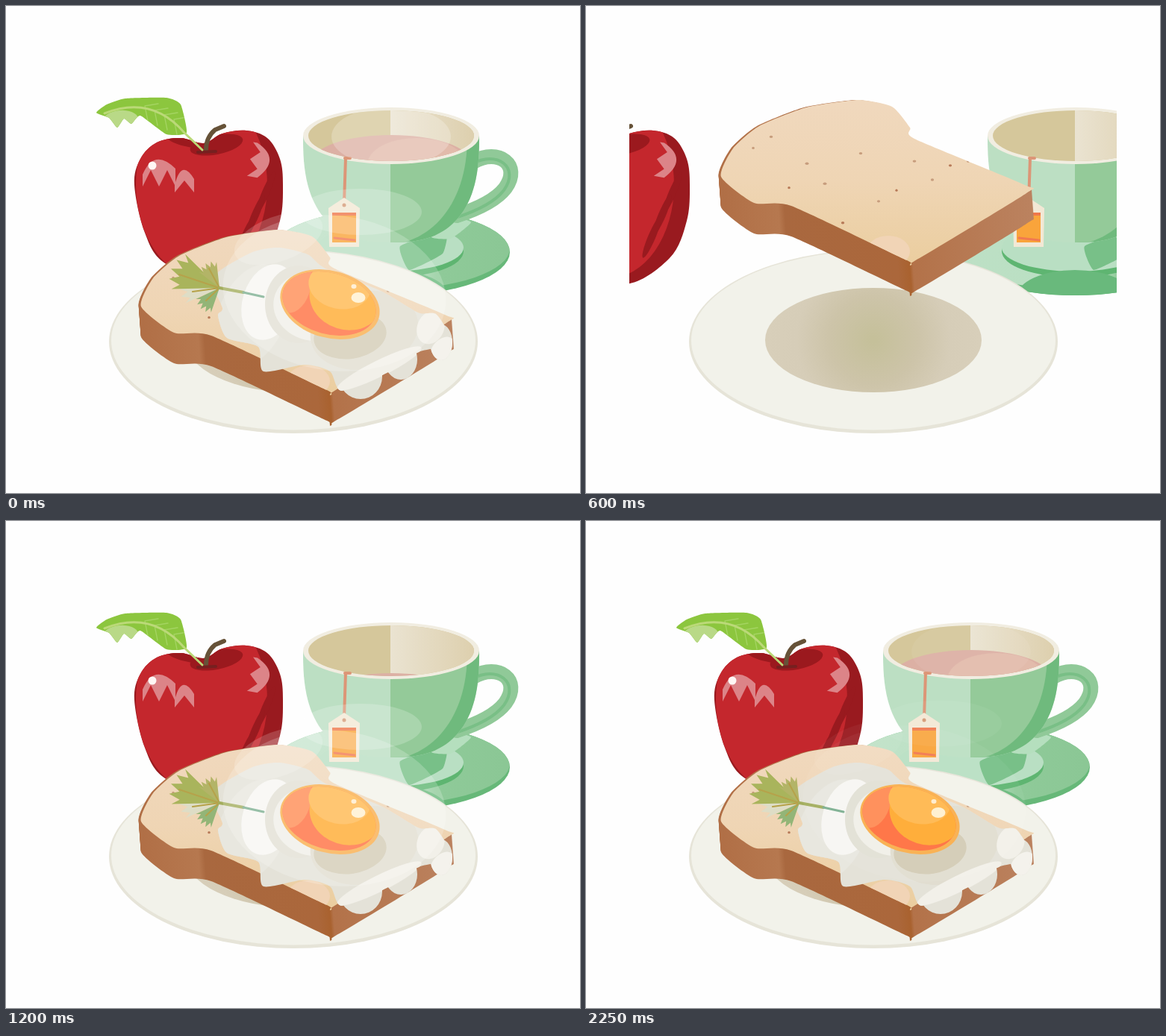
Recreate the animation shown at these times as an HTML page with a canvas. Size 769x653 px, loop 2.4 s.

```html
<!DOCTYPE html>
<html lang="en">
<head>
<meta charset="utf-8">
<title>Breakfast</title>
<style>
html, body { margin: 0; width: 100%; height: 100%; overflow: hidden; background: #fefefe; }
canvas { display: block; }
</style>
</head>
<body>
<canvas id="stage" width="769" height="653"></canvas>
<script>
const ctx = document.getElementById('stage').getContext('2d');
const STEP = 150, STEPS = 16;

// Smooth closed curve through a few key points.
function curve(points, k = 0.85) {
  const path = new Path2D(), n = points.length, t = k / 6;
  const p = i => points[(i + n) % n];
  path.moveTo(...p(0));
  for (let i = 0; i < n; i++) {
    const [a, b, c, d] = [p(i - 1), p(i), p(i + 1), p(i + 2)];
    path.bezierCurveTo(b[0] + (c[0] - a[0]) * t, b[1] + (c[1] - a[1]) * t,
      c[0] - (d[0] - b[0]) * t, c[1] - (d[1] - b[1]) * t, ...c);
  }
  return path;
}

function oval(x, y, rx, ry, turn = 0) {
  const path = new Path2D();
  path.ellipse(x, y, rx, ry, turn, 0, Math.PI * 2);
  return path;
}

// Lower half of a superellipse: the side view of a cup.
function basin(x, y, rx, ry, power) {
  const path = new Path2D();
  for (let a = 0; a <= 1.0001; a += 1 / 60) {
    const c = Math.cos(a * Math.PI), s = Math.abs(Math.sin(a * Math.PI));
    path.lineTo(x + rx * Math.sign(c) * Math.abs(c) ** (2 / power), y + ry * s ** (2 / power));
  }
  return path;
}

function box(x, y, w, h, color) {
  ctx.fillStyle = color;
  ctx.fillRect(x, y, w, h);
}

function fill(path, color) {
  ctx.fillStyle = color;
  ctx.fill(path);
}

function line(d, color, width) {
  ctx.strokeStyle = color;
  ctx.lineWidth = width;
  ctx.lineCap = 'round';
  ctx.stroke(new Path2D(d));
}

function inside(path, draw) {
  ctx.save();
  ctx.clip(path);
  draw();
  ctx.restore();
}

function at(dx, dy, draw, turn = 0) {
  ctx.save();
  ctx.translate(dx, dy);
  ctx.rotate(turn);
  draw();
  ctx.restore();
}

function random(seed) {
  return () => (seed = seed * 16807 % 2147483647) / 2147483647;
}

function blend(g, stops) {
  stops.forEach(([t, color]) => g.addColorStop(t, color));
  return g;
}

function drawPlate() {
  fill(oval(385, 450, 247, 123), '#e6e4d8');
  fill(oval(385, 448.5, 244, 120), '#f2f2ea');
  fill(oval(385, 448, 145, 70), blend(ctx.createRadialGradient(385, 448, 4, 385, 448, 145),
    [[0, '#c5c09a'], [0.4, '#cdc4a9'], [0.7, '#d6cdb8'], [1, '#d8cfba']]));
}

const slice = curve([[181, 403], [197, 365], [232, 335], [295, 310], [365, 300], [410, 309], [434, 337],
  [440, 352], [588, 414], [590, 425], [440, 516], [430, 515], [275, 442], [225, 438]], 0.6);

function drawBread() {
  const crust = blend(ctx.createLinearGradient(176, 0, 596, 0), [[0, '#b06e45'], [0.2, '#b6784f'], [0.22, '#a9683f'],
    [0.58, '#ab673b'], [0.62, '#a9622f'], [0.63, '#b37249'], [1, '#bb825f']]);
  for (let depth = 41; depth >= 0; depth--) {
    const edge = depth / 41;
    at(edge * 3 - 3, depth, () => fill(slice, crust));
  }
  fill(slice, blend(ctx.createLinearGradient(0, 305, 0, 515), [[0, '#f0d8bd'], [0.5, '#efd5b4'], [1, '#ebcea0']]));
  inside(slice, () => {
    fill(oval(405, 503, 29, 21), '#f1d4b6');
    const rnd = random(77);
    for (let i = 0; i < 16; i++) {
      const x = 200 + i * 24, y = 322 + x * 0.1 + rnd() * 110;
      fill(oval(x, y, 1.5 + rnd(), 1.7), i % 3 ? '#c79d7d' : '#b77a58');
    }
  });
}

const eggWhite = curve([[277, 364], [328, 331], [365, 324], [404, 333], [428, 352], [502, 382], [552, 411],
  [577, 414], [596, 452], [553, 464], [510, 492], [450, 516], [434, 490], [400, 481], [345, 490], [338, 457],
  [296, 445], [284, 415], [290, 405]], 0.75);
for (let i = 0; i < 3; i++) {
  eggWhite.addPath(oval(475 + 54 * i, 497 - 23 * i, 29 - 7 * i, 30 - 3 * i));
}

function drawParsley() {
  const sprig = (turn, size, color) => at(286, 378, () => {
    ctx.beginPath();
    ctx.moveTo(0, 0);
    for (let i = 0; i <= 8; i++) {
      const a = (i - 4) * 0.1, r = size * (i % 2 ? 0.8 : 1) * Math.cos(a);
      ctx.lineTo(r * Math.cos(a), r * Math.sin(a));
    }
    ctx.fillStyle = color;
    ctx.fill();
  }, turn);
  sprig(3.12, 54, '#deddc6');
  sprig(3.52, 70, '#a9b45c');
  sprig(4.2, 38, '#b3b467');
  sprig(2.3, 38, '#93b577');
  line('M232 360L286 378L250 383M268 395L286 378L272 352', '#b6a24a', 2);
  line('M286 378L318 384', '#a3ad5d', 4);
  line('M318 384L345 390', '#7daf91', 3);
}

function drawEgg() {
  fill(eggWhite, '#e4e2d8');
  inside(eggWhite, () => {
    fill(oval(330, 415, 45, 72, 0.4), '#e8e7df');
    fill(oval(352, 397, 35, 52, 0.3), '#f7f6f2');
    fill(oval(392, 400, 45, 52), '#e2e0d5');
    fill(oval(412, 403, 54, 46, 0.2), '#f0efe8');
    fill(oval(480, 435, 73, 52, -0.2), '#e1ddd0');
    fill(oval(461, 442, 49, 31, -0.15), '#d3ccb5');
    fill(oval(500, 486, 63, 11, -0.46), '#f2f0e9');
    fill(oval(569, 431, 18, 23, 0.4), '#f2f0e9');
    fill(oval(585, 460, 19, 13, -0.8), '#f4f2ec');
  });
  const core = oval(433, 399, 64, 41, 0.27);
  fill(oval(434, 400, 68, 45, 0.27), '#f9ae4d');
  fill(core, '#ff7040');
  inside(core, () => {
    fill(oval(385, 372, 24, 40, 0.2), '#ff8c55');
    fill(oval(456, 391, 50, 43, 0.3), '#ffaa31');
    fill(oval(447, 375, 42, 31, 0.2), '#ffb84f');
  });
  fill(oval(472, 391, 9.5, 7), '#fff0cf');
  fill(oval(466, 376, 3.5, 3), '#ffeccd');
  drawParsley();
}

const apple = curve([[172, 240], [180, 205], [202, 183], [234, 177], [265, 184], [290, 171], [322, 167],
  [350, 177], [367, 205], [371, 240], [367, 288], [344, 338], [284, 373], [213, 345], [186, 304]], 1);

// A glossy patch: an arc with alternating long and short points.
function drawGloss(x, y, width, drop, count) {
  ctx.beginPath();
  ctx.moveTo(x, y + 18);
  ctx.quadraticCurveTo(x + width * 0.35, y - 18, x + width, y + 10);
  for (let i = count; i >= 0; i--) {
    ctx.lineTo(x + width * i / count, y + (i % 2 ? 12 : drop));
  }
  ctx.fillStyle = '#dc8488';
  ctx.fill();
}

function drawApple() {
  fill(apple, '#991a1f');
  inside(apple, () => {
    fill(oval(262, 240, 88, 125), '#c4272d');
    fill(oval(282, 186, 36, 13, -0.2), '#9b191e');
    fill(oval(240, 183, 24, 5, 0.25), '#9b191e');
    for (let i = 0; i < 3; i++) fill(oval(348 - i * 14, 250 + i * 30, 5, 30, 0.4), '#991a1f');
    drawGloss(183, 208, 44, 34, 4);
    drawGloss(226, 222, 26, 28, 2);
    at(350, 190, () => drawGloss(-4, -4, 46, 24, 4), 1.75);
  });
  fill(oval(196, 214, 5.5, 5.5), '#fff6f4');
  line('M268 193Q268 176 280 166L292 161', '#665238', 6);
  line('M257 196L281 195', '#762020', 4);
  const leaf = curve([[121, 143], [135, 132], [160, 124], [215, 123], [234, 132], [242, 170], [215, 172],
    [180, 147], [168, 158], [158, 151], [149, 163], [138, 150]], 0.5);
  fill(leaf, '#8cc63e');
  inside(leaf, () => {
    fill(oval(153, 153, 24, 13, -0.1), '#b9d987');
    for (let i = 0; i < 4; i++) {
      const x = 186 + i * 13, y = 134 + i * 6;
      line(`M${x} ${y}l18 -3M${x} ${y}l4 20`, '#a4d462', 1.3);
    }
  });
  line('M132 144Q195 119 239 170L263 193', '#bbd978', 3);
}

function drawSaucer() {
  const dish = oval(515, 330, 160, 58);
  fill(dish, '#67b879');
  inside(dish, () => {
    fill(oval(515, 325, 160, 55), blend(ctx.createLinearGradient(360, 0, 670, 0),
      [[0, '#bde0c5'], [0.55, '#b9dfc2'], [0.7, '#8fca99'], [1, '#8bc795']]));
    fill(oval(515, 329, 98, 35), '#5eb571');
    fill(oval(515, 324, 98, 32), '#b9dfc3');
    fill(oval(515, 390, 78, 36), '#69b97c');
    fill(curve([[528, 322], [590, 300], [585, 332], [540, 354]], 0.4), '#78c088');
    fill(curve([[588, 280], [623, 290], [596, 312], [570, 310]], 0.4), '#b5dfbe');
  });
}

const CUP = { x: 516, y: 174, rx: 118, depth: 143 };
const cupBody = basin(CUP.x, CUP.y, CUP.rx, CUP.depth, 2.6);
const bowl = oval(CUP.x, CUP.y, 111, 34);

function drawCup(level) {
  drawSaucer();
  const handle = 'M626 209C660 190 691 213 669 244C656 261 632 272 604 281';
  line(handle, '#90c998', 20);
  at(-2, 3, () => line(handle, '#79bf86', 4));
  fill(cupBody, '#bcdfc3');
  inside(cupBody, () => {
    box(515, 130, 140, 200, '#6fba7d');
    const lit = new Path2D();
    lit.rect(515, 130, 140, 200);
    inside(lit, () => fill(basin(CUP.x - 16, CUP.y, CUP.rx, CUP.depth + 4, 2.2), '#94ca99'));
  });
  fill(oval(CUP.x, CUP.y, CUP.rx, 38), '#f1ede1');
  fill(bowl, '#d5c79b');
  inside(bowl, () => {
    box(515, 130, 120, 90, blend(ctx.createLinearGradient(515, 0, 630, 0), [[0, '#eae3d1'], [1, '#ddcfad']]));
    if (level) {
      const y = 206 - 33 * level;
      fill(oval(CUP.x, y + 36, 106, 36), '#dcb0a4');
      fill(oval(CUP.x + 34, y + 40, 66, 36), '#e2bbab');
    }
  });
  line('M454 204L461 204M455 204L453 264', '#dc9677', 4);
  fill(curve([[432, 271], [453, 257], [474, 271], [473, 323], [433, 323]], 0), '#f2e8d5');
  box(437, 278, 32, 39, '#f9a43b');
  box(437, 277, 32, 4, '#ef774a');
  line('M440 311L467 314', '#f17950', 3);
  fill(oval(453, 267, 2.5, 2.5), '#d59a77');
}

// Steam leaves in puffs that rise and fade.
function drawSteam(s) {
  const age = s % 4 / 4, strength = 0.28 * (1 - age);
  const white = a => `rgba(255,255,255,${a * strength})`;
  fill(oval(440, 385 - age * 8, 150, 104, 0.12), white(0.7));
  fill(oval(365, 312 - age * 10, 62, 30, -0.35), white(0.6));
  fill(oval(475, 276 - age * 6, 82, 31), white(0.7));
  if (s > 8) inside(bowl, () => fill(oval(CUP.x, 175, 80, 40), white(0.8)));
}

function drawScene(step) {
  box(0, 0, 769, 653, '#fefefe');
  const s = step || STEPS;
  const left = end => Math.max(0, end - s);
  ctx.save();
  ctx.beginPath();
  ctx.rect(58, 0, 653, 653);
  ctx.clip();
  if (s >= 3) {
    at(140 * left(5), 0, () => drawCup(s < 8 ? 0 : Math.min(1, 0.06 + (s - 8) * 0.235)));
    at(-116 * left(6), 0, drawApple);
  }
  at(0, s === 1 ? 232 : 88 * Math.min(1, left(3)), drawPlate);
  if (s >= 3) at(0, -174 * left(5), drawBread);
  if (s >= 5) at(0, -201 * left(7), drawEgg);
  if (s >= 8) drawSteam(s);
  ctx.restore();
}

const start = performance.now();
function tick() {
  drawScene(Math.floor((performance.now() - start) / STEP) % STEPS);
  requestAnimationFrame(tick);
}
tick();
</script>
</body>
</html>
```
